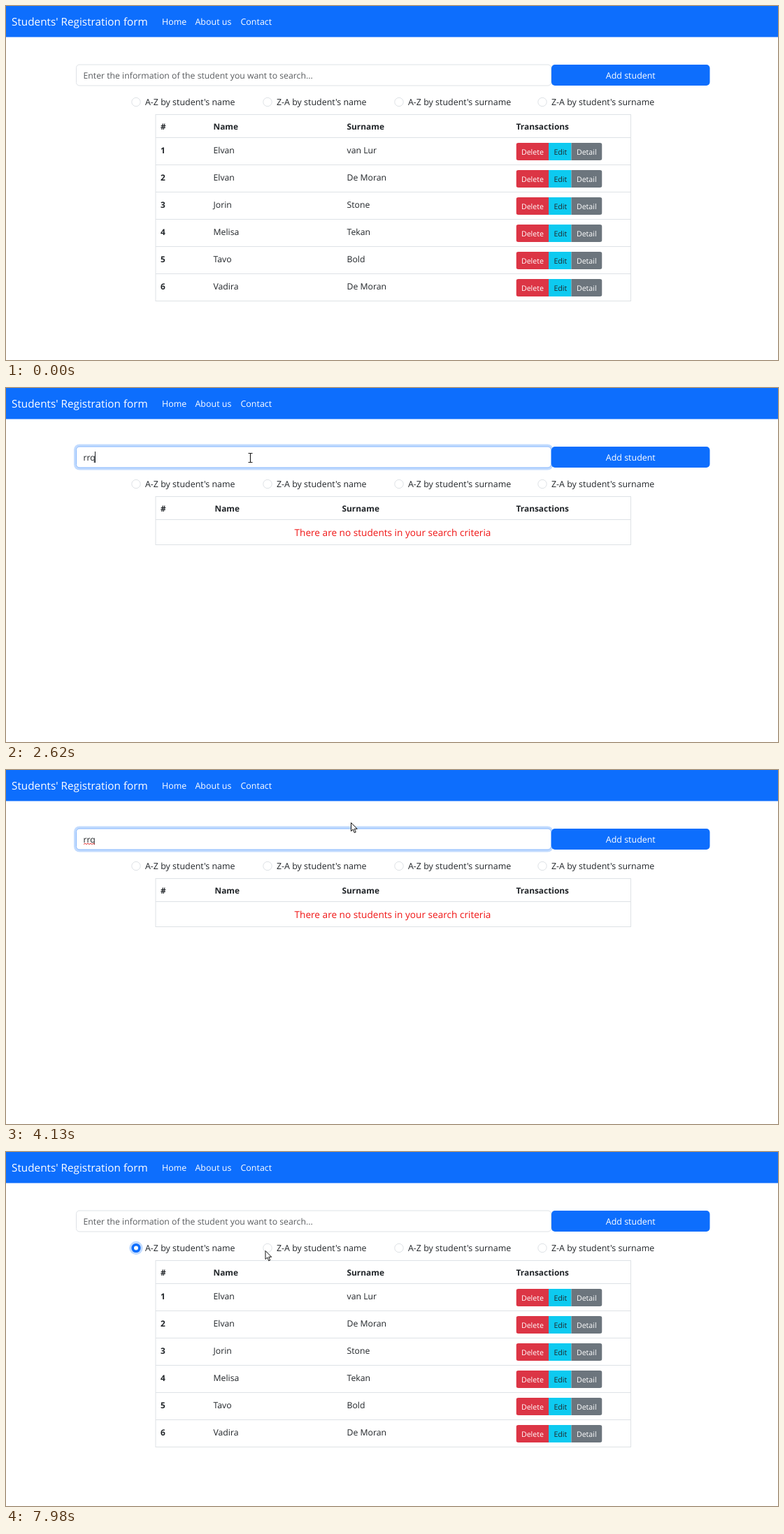
These frames come from a looping animation (1104 by 507 pixels, 8 s). An HTML page:

```html
<!DOCTYPE html>
<html lang="en">
<head>
<meta charset="utf-8">
<title>Students' Registration form</title>
<style>
  html, body { margin: 0; width: 100%; height: 100%; overflow: hidden; background: #fff; }
  svg { display: block; }
  text {
    font: 12.25px "Open Sans", "Noto Sans", sans-serif;
    fill: #212529;
    white-space: pre;
    text-rendering: geometricPrecision;
  }
  .brand { font-size: 15.3px; }
  .nav, .label { font-size: 12.45px; }
  .white, .brand, .nav { fill: #fff; }
  .bold { font-size: 11.9px; font-weight: 700; }
  .small { font-size: 10.65px; }
  .hint { fill: #595c5f; }
  .empty { font-size: 13.64px; fill: #f01414; text-anchor: middle; }
  .line { fill: none; stroke: #dee2e6; }
</style>
</head>
<body>
<svg width="1104" height="507" viewBox="0 0 1104 507">
  <defs>
    <clipPath id="rounded"><rect x="729.5" y="196" width="123" height="25" rx="3.3"/></clipPath>
  </defs>
  <rect width="1104" height="44.5" fill="#0d6efd"/>
  <text class="brand" x="8" y="28">Students' Registration form</text>
  <text class="nav" x="223" y="27">Home</text>
  <text class="nav" x="270.5" y="27">About us</text>
  <text class="nav" x="335.5" y="27">Contact</text>

  <rect class="line" x="100.5" y="84" width="679" height="30" rx="4.5"/>
  <g id="focus">
    <rect x="97" y="80.5" width="685.5" height="37" rx="8" fill="#c2dbfe"/>
    <rect x="100.5" y="84" width="679" height="30" rx="4.5" fill="#fff" stroke="#86b7fe"/>
  </g>
  <text class="hint" id="hint" x="110.5" y="104">Enter the information of the student you want to search...</text>
  <text id="query" x="110.5" y="104"></text>
  <path id="squiggle" fill="none" stroke="#e03030"/>
  <rect id="caret" y="91" width="1" height="16" fill="#212529"/>

  <rect x="780" y="84" width="226.5" height="30" rx="5" fill="#0d6efd"/>
  <rect id="addHover" x="780" y="84" width="226.5" height="30" rx="5" fill="#0b5ed7"/>
  <text class="label white" x="893.3" y="104" text-anchor="middle">Add student</text>

  <g id="radios"></g>
  <g id="checked">
    <circle id="radioRing" cx="186" cy="137.5" r="9.7" fill="#c2dbfe"/>
    <circle cx="186" cy="137.5" r="6.6" fill="#0d6efd"/>
    <circle cx="186" cy="137.5" r="3" fill="#fff"/>
  </g>

  <g id="fullTable"></g>
  <g id="emptyTable"></g>

  <g id="cursor">
    <path id="arrow" d="M.5 .5V12.6L3.3 10 5.2 14.8 7.2 14 5.3 9.3H9.2Z" fill="#fff" stroke="#111"/>
    <path id="beam" d="M-3 -6.5H3M0 -6.5V6.5M-3 6.5H3" fill="none" stroke="#222" stroke-width="1.2"/>
    <path id="hand" d="M-1 0Q.2 -1 1.3 0V5L7 6.2Q8 6.6 8 8V11L6.5 15H0L-4 9.5Q-4 7.8 -1 9.3Z" fill="#fff" stroke="#111"/>
  </g>
</svg>
<script>
const LOOP = 8000, FOCUS = 1280, BLUR = 6930;
const WORD = "rrq", TYPE = 2030, TYPE_GAP = 225, ERASE = 5460, ERASE_GAP = 130;
const ROW = 39;

const $ = id => document.getElementById(id);
const text = (x, y, cls, str) => `<text class="${cls}" x="${x}" y="${y}">${str}</text>`;
const rule = y => `<path class="line" d="M214 ${y}H893.5"/>`;
const border = height => `<rect class="line" x="214" y="155.5" width="679.5" height="${height}"/>`;
const header = (nameX, surnameX) => text(221, 177, "bold", "#") + text(nameX, 177, "bold", "Name") +
  text(surnameX, 177, "bold", "Surname") + text(729.5, 177, "bold", "Transactions");
const button = (x, width, fill, cls, label) =>
  `<rect x="${x}" y="196" width="${width}" height="25" fill="${fill}" clip-path="url(#rounded)"/>` +
  text(x + 7.4, 213, cls, label);
const actions = button(729.5, 46.5, "#dc3545", "small white", "Delete") +
  button(776, 32.5, "#0dcaf0", "small", "Edit") + button(808.5, 44, "#6c757d", "small white", "Detail");

const radios = { 186: "A-Z by student's name", 374: "Z-A by student's name",
  562: "A-Z by student's surname", 767: "Z-A by student's surname" };
const students = ["Elvan/van Lur", "Elvan/De Moran", "Jorin/Stone", "Melisa/Tekan", "Tavo/Bold", "Vadira/De Moran"];

$("radios").innerHTML = Object.entries(radios).map(([x, label]) =>
  `<circle class="line" cx="${x}" cy="137.5" r="6.2"/>` + text(+x + 13, 142, "label", label)).join("");

$("fullTable").innerHTML = header(296.5, 487.5) + students.map((student, i) => {
  const [name, surname] = student.split("/");
  return `<g transform="translate(0 ${ROW * i})">` + rule(188.5) + text(221, 211, "bold", i + 1) +
    text(296.5, 211, "", name) + text(487.5, 211, "", surname) + actions + "</g>";
}).join("") + border(33 + ROW * students.length);

$("emptyTable").innerHTML = header(298.5, 480.5) +
  `<rect id="rowHover" x="214" y="189" width="679.5" height="35.5" fill="#ececec"/>` + rule(188.5) +
  text(553, 212, "empty", "There are no students in your search criteria") + border(69);

$("squiggle").setAttribute("d", "M111 106.5" + "l2 -1.5 2 1.5".repeat(4));

// Places the pointer visits; it glides evenly from one to the next
const visits = [
  { arrive: 190, leave: 190, x: 1061, y: 476 },
  { arrive: 400, leave: 400, x: 860, y: -9 },
  { arrive: 740, leave: 740, x: 336, y: -9 },
  { arrive: 1080, leave: 2650, x: 349.5, y: 100 },
  { arrive: 3050, leave: 3110, x: 496, y: 219 },
  { arrive: 3530, leave: 3830, x: 588, y: 211 },
  { arrive: 4130, leave: 4200, x: 493, y: 75 },
  { arrive: 4590, leave: 5720, x: 412.5, y: 95 },
  { arrive: 6200, leave: 6280, x: 256, y: 145 },
  { arrive: 6730, leave: 7000, x: 185, y: 139 },
  { arrive: 7330, leave: 7330, x: 262, y: 178 },
  { arrive: 7720, leave: LOOP, x: 370.5, y: 141 }
];

const clamp = (v, max = 1) => Math.max(0, Math.min(max, v));
const fade = (t, on, off, ms = 150) => clamp((t - on) / ms) * (1 - clamp((t - off) / ms));
const show = (id, on) => { $(id).style.display = on ? "" : "none"; };
const keysHit = (t, start, gap) => clamp(Math.floor((t - start) / gap) + 1, WORD.length);

function pointerAt(t) {
  const next = visits.findIndex(v => v.arrive > t);
  if (next === 0) return { x: 0, y: -99 };
  const from = visits.at(next < 0 ? -1 : next - 1), to = visits.at(next);
  const k = clamp((t - from.leave) / (to.arrive - from.leave || 1));
  return { x: from.x + (to.x - from.x) * k, y: from.y + (to.y - from.y) * k };
}

function drawPointer(t) {
  const { x, y } = pointerAt(t);
  const inBar = y >= 84 && y <= 114;
  const beam = inBar && x >= 100 && x < 780;
  const onAdd = inBar && x >= 780 && x <= 1007;
  const onContact = x >= 329 && x <= 386 && y >= 8 && y <= 36;
  show("beam", beam);
  show("hand", onAdd || onContact);
  show("arrow", !beam && !onAdd && !onContact);
  show("rowHover", y >= 189 && y <= 224.5);
  $("cursor").setAttribute("transform", `translate(${x.toFixed(1)} ${y.toFixed(1)})`);
}

function drawField(t) {
  const typed = keysHit(t, TYPE, TYPE_GAP), erased = keysHit(t, ERASE, ERASE_GAP);
  const value = WORD.slice(0, typed - erased);
  const lastKey = erased ? ERASE + (erased - 1) * ERASE_GAP : typed ? TYPE + (typed - 1) * TYPE_GAP : FOCUS;
  const blinkOn = Math.floor((t - lastKey) / 500) % 2 === 0;

  $("query").textContent = value;
  show("hint", !value);
  show("squiggle", value === WORD && t >= 3300);
  show("caret", t >= FOCUS && t < BLUR && blinkOn);
  $("caret").setAttribute("x", Math.floor(110.5 + (value ? $("query").getComputedTextLength() : 0)));
  $("focus").style.opacity = fade(t, FOCUS, BLUR);
  show("fullTable", value.length < 2);
  show("emptyTable", value.length > 1);
}

function draw(t) {
  drawField(t);
  drawPointer(t);
  $("addHover").style.opacity = fade(t, 320, 380, 60);
  show("checked", t >= BLUR);
  $("radioRing").style.opacity = fade(t, BLUR, LOOP);
}

const start = performance.now();
function tick() {
  draw((performance.now() - start) % LOOP);
  requestAnimationFrame(tick);
}
tick();
</script>
</body>
</html>
```
